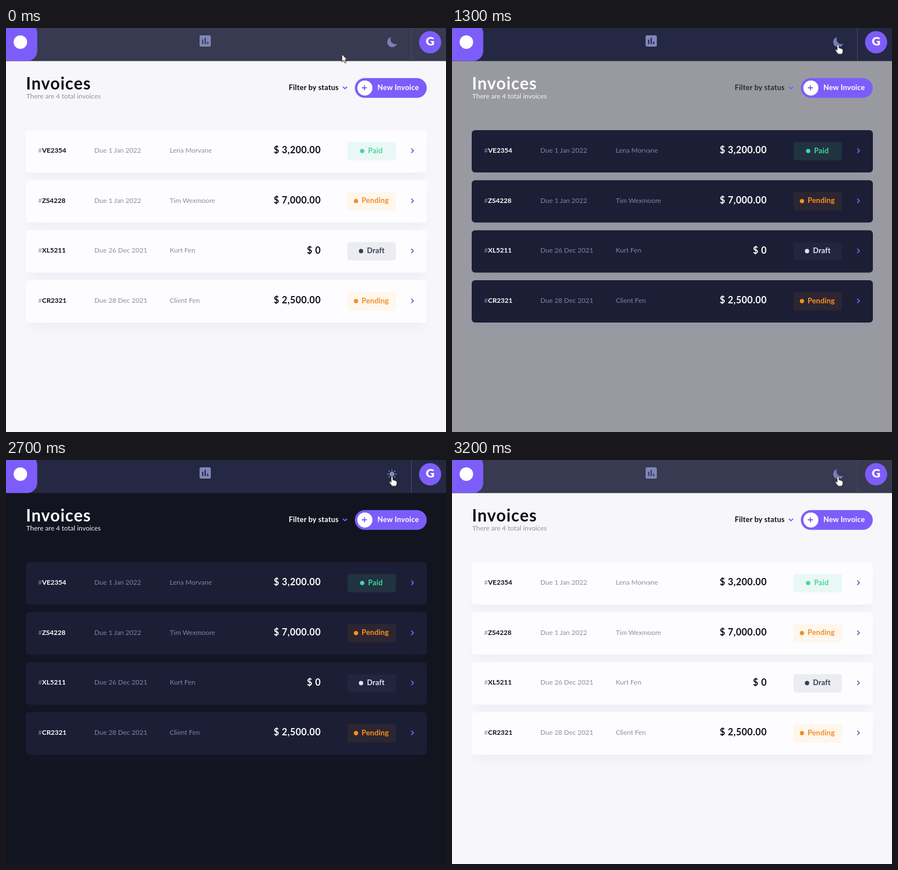
Animation, 782 px wide and 716 px high, one loop 3.3 s. Source, as an HTML page:

```html
<!DOCTYPE html>
<html lang="en">
<head>
<meta charset="utf-8">
<title>Invoices</title>
<style>
  html, body { margin: 0; width: 100%; height: 100%; overflow: hidden; }
  svg { display: block; width: 782px; height: 716px; font-family: Lato, Inter, sans-serif; }
  svg {
    --head: #373a50; --rule: #474a64; --title: #0c0e16; --sub: #9092a4;
    --card: #fdfcfe; --strong: #0c0e16; --muted: #8d8fa3; --arrow: #7562c4;
    --paid: #4bd3a2; --paid-bg: #e9f8f5;
    --pending: #f28c2e; --pending-bg: #fff6ec;
    --draft: #373b53; --draft-bg: #ecedf1;
  }
  svg.dark {
    --head: #252842; --rule: #494e6e; --title: #fff; --sub: #f4f4f8;
    --card: #1c1e35; --strong: #fff; --muted: #7f83a9; --arrow: #7c5dfa;
    --paid: #41d9a4; --paid-bg: #213240;
    --pending: #ff8f1f; --pending-bg: #2b2631;
    --draft: #dfe3fa; --draft-bg: #22253f;
  }
  .bold { font-weight: 700; }
  .small { font-size: 12px; }
  .label { font-size: 13px; font-weight: 700; letter-spacing: .22px; }
  .price { font-size: 16.5px; font-weight: 700; letter-spacing: .5px; text-anchor: end; }
  .muted { fill: var(--muted); }
  .strong { fill: var(--strong); }
  .line { fill: none; stroke-width: 1.8; }
  .purple { fill: #7c5dfa; }
  .icon { fill: #8086ba; }
</style>
</head>
<body>
<svg id="stage" viewBox="0 0 782 716">
  <defs>
    <filter id="blur" x="-10%" y="-60%" width="120%" height="220%">
      <feGaussianBlur stdDeviation="10"/>
    </filter>
  </defs>
  <rect id="page" width="782" height="716" fill="#f7f6fa"/>

  <rect width="782" height="58.6" fill="var(--head)"/>
  <rect x="-20" y="-9" width="75.5" height="67.6" rx="18" class="purple"/>
  <circle cx="25.5" cy="25" r="12" fill="#fff"/>
  <path class="icon" transform="translate(340.7 9.7) scale(1.11)" fill-rule="evenodd"
    d="M5 3h14a2 2 0 0 1 2 2v14a2 2 0 0 1-2 2H5a2 2 0 0 1-2-2V5a2 2 0 0 1 2-2zM7 10v7h2v-7zM11 7v10h2V7zM15 13v4h2v-4z"/>
  <path id="moon" fill="#7b7fb8" d="M684.5 16.2A9 9 0 1 0 695 28A8.4 8.4 0 0 1 684.5 16.2z"/>
  <g id="sun" fill="#858bb8" stroke="#858bb8" stroke-width="1.8" stroke-linecap="round"></g>
  <path d="M720.5 0V58.6" stroke="var(--rule)"/>
  <circle cx="753.8" cy="25.2" r="19.7" class="purple"/>
  <text x="753.8" y="31" font-size="21.5" font-weight="900" fill="#fff" text-anchor="middle">G</text>

  <text x="35.5" y="109" font-size="29.5" letter-spacing="1.1" class="bold" fill="var(--title)">Invoices</text>
  <text x="36" y="125" class="small" fill="var(--sub)">There are 4 total invoices</text>
  <text id="filter" x="502.5" y="109.5" class="label" fill="#0c0e16">Filter by status</text>
  <path class="line" stroke="#7c5dfa" d="M598.8 104l3.7 3.7 3.7-3.7"/>
  <rect x="620" y="88.8" width="127.8" height="35" rx="17.5" class="purple"/>
  <circle cx="637.8" cy="106.3" r="13.4" fill="#fff"/>
  <path class="line" stroke="#7c5dfa" d="M632.5 106h9M637 101.5v9"/>
  <text x="660" y="109.5" class="label" fill="#fff">New Invoice</text>

  <g id="rows"></g>

  <g id="cursor" stroke="#111" fill="#fff" stroke-width=".9">
    <path id="arrow" d="M0 0V13.5L3.2 10.6L5.4 15.6L7.6 14.6L5.5 9.8H9.6z"/>
    <path id="hand"
      d="M0 0c1.1 0 1.7.8 1.7 1.8v4.4c1.5-.6 2.6 0 2.9.9c1.3-.4 2.2.1 2.5 1c1.1-.1 1.7.6 1.7 1.7v2.5c0 2.2-1.3 3-1.4 4.7h-7.6c-.4-2-3.3-4.2-4.6-6.7c-.6-1.3.8-2.2 1.9-1.3l1.3 1.2v-8.4c0-1 .5-1.8 1.6-1.8z"/>
  </g>
</svg>
<script>
const LOOP = 3300, STEP = 100, FADE = 300;
const DARK_ON = 1225, DARK_OFF = 2770;
const SUN_ON = 1700, HOVER = 800;
const $ = id => document.getElementById(id);

const invoices = [
  ['VE2354', '1 Jan 2022', 'Lena Morvane', '3,200.00', 'Paid'],
  ['ZS4228', '1 Jan 2022', 'Tim Wexmoore', '7,000.00', 'Pending'],
  ['XL5211', '26 Dec 2021', 'Kurt Fen', '0', 'Draft'],
  ['CR2321', '28 Dec 2021', 'Client Fen', '2,500.00', 'Pending']
];
const badgeX = { Paid: [633, 643.5], Pending: [622, 632], Draft: [631, 641.5] };

const shadow = `<rect x="43" y="195" width="697" height="71" rx="6"
  fill="#48549f" opacity=".05" filter="url(#blur)"/>`;

function row([id, due, client, total, status], i) {
  const tone = status.toLowerCase(), [dot, label] = badgeX[status];
  return `<g transform="translate(0 ${i * 88.7})">${shadow}
    <rect x="35" y="181" width="713" height="75" rx="6" fill="var(--card)"/>
    <text x="57" y="221" class="small muted">#<tspan class="bold strong">${id}</tspan></text>
    <text x="157" y="221" class="small muted">Due ${due}</text>
    <text x="291" y="221" class="small muted">${client}</text>
    <text x="559.5" y="222.3" class="price strong">$ ${total}</text>
    <rect x="607" y="202" width="86" height="32.5" rx="4" fill="var(--${tone}-bg)"/>
    <circle cx="${dot}" cy="218" r="3.8" fill="var(--${tone})"/>
    <text x="${label}" y="221.5" class="label" fill="var(--${tone})">${status}</text>
    <path class="line" stroke="var(--arrow)" d="M720.3 213.7l3.8 3.8-3.8 3.8"/>
  </g>`;
}
$('rows').innerHTML = invoices.map(row).join('');

$('sun').innerHTML = '<circle cx="686" cy="25" r="4.4" stroke="none"/>' +
  Array.from({ length: 8 }, (_, i) =>
    `<path d="M686 17.6v.7" transform="rotate(${i * 45} 686 25)"/>`).join('');

// Builds a paused timeline from [time, properties, easing] steps.
function timeline(el, steps) {
  const frames = steps.map(([t, props, easing = 'linear']) =>
    ({ offset: t / LOOP, easing, ...props }));
  const anim = el.animate(frames, { duration: LOOP, iterations: Infinity });
  anim.pause();
  return anim;
}

function themeFade(el, light, dark, delay = 0) {
  const on = DARK_ON + delay, off = DARK_OFF + delay;
  return timeline(el, [
    [0, { fill: light }],
    [on, { fill: light }, 'ease'],
    [on + FADE, { fill: dark }],
    [off, { fill: dark }, 'ease'],
    [off + FADE, { fill: light }],
    [LOOP, { fill: light }]
  ]);
}

const from = { transform: 'translate(597px, 46.5px)' };
const to = { transform: 'translate(686px, 29.3px)' };
const anims = [
  themeFade($('page'), '#f7f6fa', '#121420'),
  themeFade($('filter'), '#0c0e16', '#ffffff', 40),
  timeline($('cursor'), [[0, from, 'ease-in-out'], [900, to], [LOOP, to]])
];

const show = (id, on) => { $(id).style.display = on ? '' : 'none'; };

function draw(now) {
  const t = Math.floor(now % LOOP / STEP) * STEP;
  for (const a of anims) a.currentTime = t;
  $('stage').classList.toggle('dark', t >= DARK_ON && t < DARK_OFF);
  const sunny = t >= SUN_ON && t < DARK_OFF;
  show('sun', sunny);
  show('moon', !sunny);
  show('hand', t >= HOVER);
  show('arrow', t < HOVER);
}

const start = performance.now();
function tick() {
  draw(performance.now() - start);
  requestAnimationFrame(tick);
}
tick();
</script>
</body>
</html>
```
